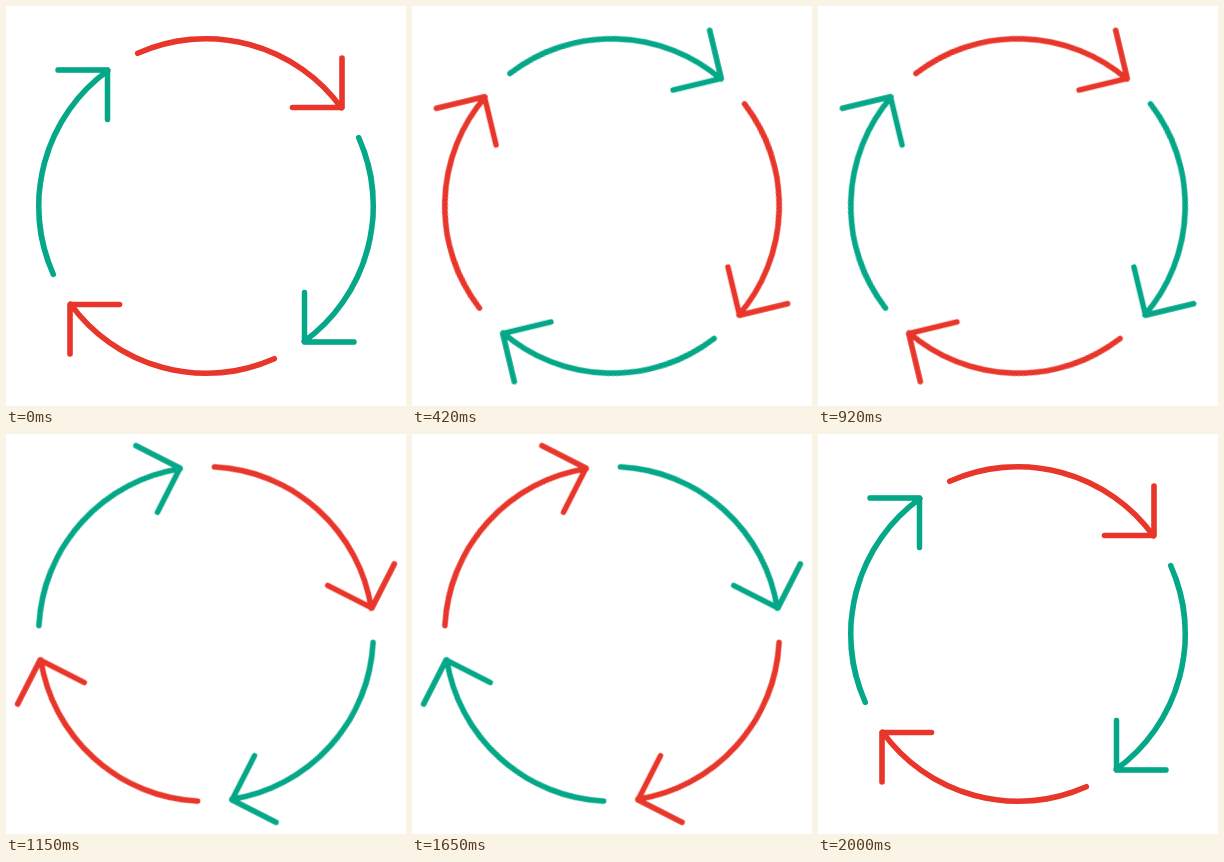
An HTML page for the animation above (2.02 s loop, 400x400 px).

```html
<!DOCTYPE html>
<html lang="en">
<head>
<meta charset="utf-8">
<title>Circling arrows</title>
<style>
  html, body { margin: 0; width: 100%; height: 100%; overflow: hidden; background: #fff; }
  svg { display: block; width: 100%; height: 100%; }

  /* Two stepped half turns, offset by 20 ms, add up to one full turn in 4.5 degree ticks. */
  .even, .odd { transform-origin: 200px 200px; animation: 2020ms infinite; }
  .even { animation-name: even; }
  .odd { animation-name: odd; }

  @keyframes even {
    0% { transform: rotate(0deg); animation-timing-function: steps(40, jump-end); }
    99.0098%, 100% { transform: rotate(180deg); }
  }
  @keyframes odd {
    0% { transform: rotate(0deg); animation-timing-function: step-end; }
    0.99% { transform: rotate(0deg); animation-timing-function: steps(40, jump-start); }
    100% { transform: rotate(180deg); }
  }

  .arrows { fill: none; stroke-width: 5.6; stroke-linecap: round; stroke-linejoin: round; }
  .red { stroke: #e8362b; }
  .green { stroke: #04a787; }
</style>
</head>
<body>
<svg viewBox="0 0 400 400">
  <defs>
    <path id="arrow" d="M131.7 47.3A167.3 167.3 0 0 1 335.5 101.9L336 101.5M286.5 101.5H336V52"/>
  </defs>
  <g class="even">
    <g class="odd">
      <g class="arrows">
        <use class="red" href="#arrow"/>
        <use class="green" href="#arrow" transform="rotate(90 200 200)"/>
        <use class="red" href="#arrow" transform="rotate(180 200 200)"/>
        <use class="green" href="#arrow" transform="rotate(270 200 200)"/>
      </g>
    </g>
  </g>
</svg>
</body>
</html>
```
